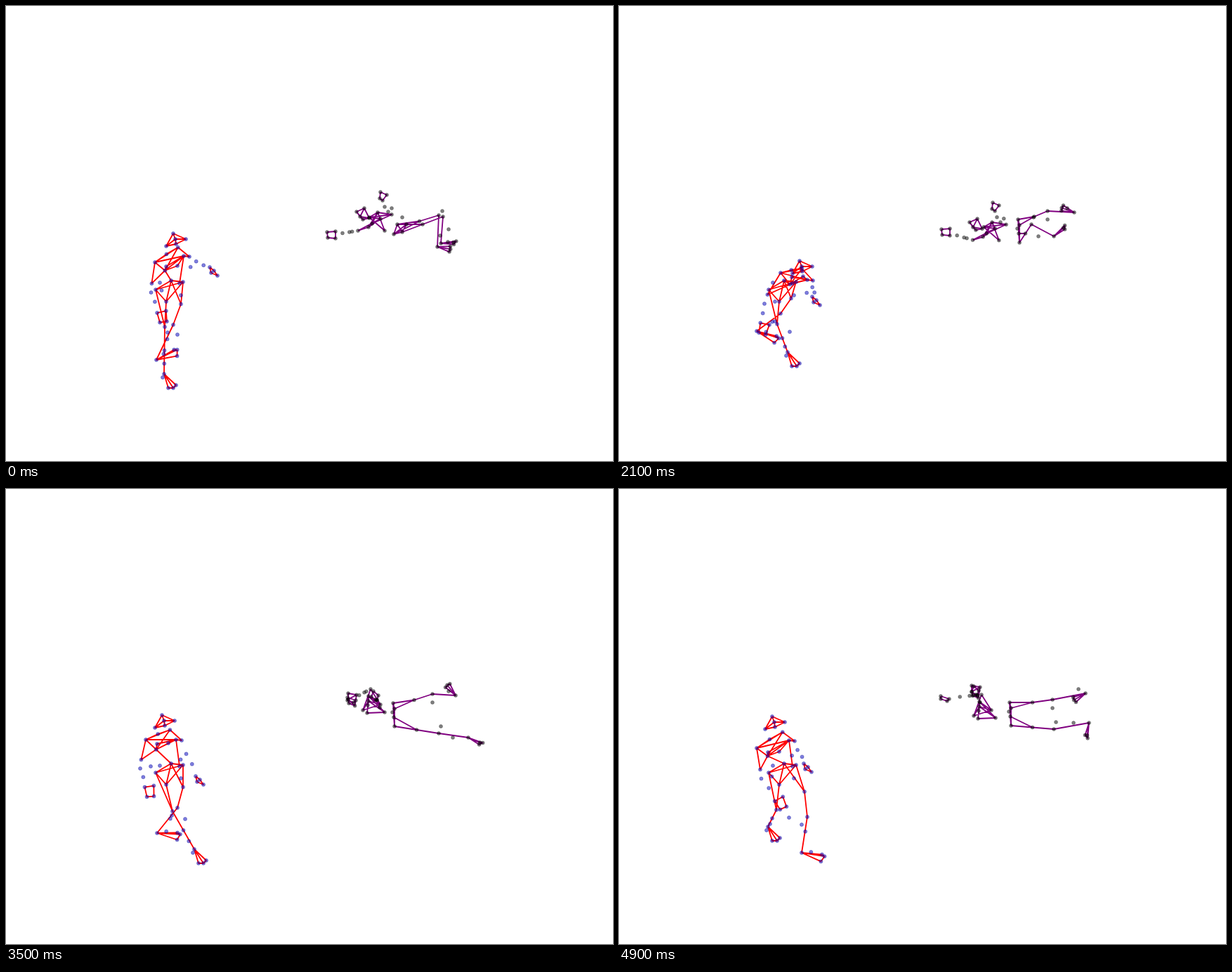
An HTML page with a canvas that plays this animation: 864x648 px, repeating every 5000 ms.

```html
<!DOCTYPE html>
<html lang="en">
<head>
<meta charset="utf-8">
<title>Two marker skeletons</title>
<style>
html, body { margin: 0; width: 100%; height: 100%; overflow: hidden; background: #fff; }
canvas { display: block; }
</style>
</head>
<body>
<canvas id="stage" width="864" height="648"></canvas>
<script>
const ctx = document.getElementById('stage').getContext('2d');
const LOOP = 5000, STEP = 100;
const KEYS = [0, 800, 2100, 2700, 3500, 4000, 4900];

// Paths of the main joints: x, y (or one angle in degrees) at each key time.
const walkPath = {
  head:  [238,324, 247,342, 257,363, 243,340, 222,322, 216,319, 218,324],
  shR:   [212,365, 211,379, 230,380, 219,374, 199,357, 195,356, 196,369],
  shL:   [253,356, 252,363, 268,390, 262,376, 242,357, 238,350, 242,358],
  handR: [223,443, 252,446, 206,460, 199,434, 205,431, 208,437, 231,448],
  handL: [295,378, 256,351, 280,420, 281,437, 275,415, 285,403, 268,397],
  kneeA: [238,454, 250,459, 230,438, 232,448, 244,454, 255,456, 268,467],
  heelA: [214,504, 228,509, 196,463, 198,475, 215,490, 230,498, 260,518],
  kneeB: [226,457, 220,453, 225,453, 233,455, 237,459, 238,458, 224,457],
  heelB: [225,524, 208,481, 240,493, 252,500, 268,513, 242,513, 212,481],
  turnA: [-26, -10, 18, 11, 3, 3, 9]
};
const crawlPath = {
  head:  [499,293, 500,299, 499,308, 493,306, 487,291, 495,284, 502,280],
  neck:  [529,294, 530,301, 531,308, 525,307, 516,302, 511,306, 513,310],
  handR: [463,326, 463,333, 465,322, 487,297, 491,300, 471,299, 463,298],
  handL: [536,271, 537,277, 535,286, 533,289, 526,294, 514,290, 508,287],
  hip:   [557,311, 560,314, 568,304, 561,305, 551,305, 552,304, 556,304],
  kneeA: [616,298, 610,294, 610,292, 598,289, 607,292, 617,300, 617,300],
  kneeB: [622,300, 598,296, 587,311, 620,326, 616,348, 615,344, 619,342],
  heelA: [614,343, 618,339, 648,294, 631,287, 640,294, 660,306, 664,291],
  heelB: [619,338, 639,319, 619,328, 639,347, 658,354, 665,339, 669,333],
  turnA: [10, -14, -160, -165, -129, -106, -210],
  turnB: [-8, -77, -45, -17, 20, 90, 95]
};

// Smooth curve through the key values; the loop restarts with a cut.
function along(track, t) {
  const last = KEYS.length - 1, dim = track.length / KEYS.length;
  const k = Math.max(0, KEYS.findLastIndex((key, i) => i < last && t >= key));
  const span = KEYS[k + 1] - KEYS[k], u = (t - KEYS[k]) / span, v = 1 - u;
  return Array.from({ length: dim }, (_, axis) => {
    const val = i => track[dim * i + axis];
    const slope = i => {
      const a = Math.max(i - 1, 0), b = Math.min(i + 1, last);
      return (val(b) - val(a)) / (KEYS[b] - KEYS[a]);
    };
    return val(k) * (1 + 2 * u) * v * v + val(k + 1) * u * u * (3 - 2 * u)
      + span * u * v * (slope(k) * v - slope(k + 1) * u);
  });
}

const poseAt = (paths, t) =>
  Object.fromEntries(Object.entries(paths).map(([name, track]) => [name, along(track, t)]));

const lerp = (a, b, u) => a.map((v, i) => v + (b[i] - v) * u);
const shift = (p, x, y) => [p[0] + x, p[1] + y];
const between = (a, b, u, x = 0, y = 0) => shift(lerp(a, b, u), x, y);

function ease(t, from, to) {
  const u = Math.min(1, Math.max(0, (t - from) / (to - from)));
  return u * u * (3 - 2 * u);
}

// Sets a rigid part, given by offsets from its origin, turned by some degrees.
function place(marks, origin, part, turn = 0) {
  const c = Math.cos(turn * Math.PI / 180), s = Math.sin(turn * Math.PI / 180);
  for (const name in part) {
    const [x, y] = part[name];
    marks[name] = shift(origin, x * c - y * s, x * s + y * c);
  }
}

// Sets a part that rolls over in depth: its offsets blend from one view to another.
function roll(marks, origin, part, u) {
  for (const name in part) {
    const [x0, y0, x1, y1] = part[name];
    marks[name] = shift(origin, x0 + (x1 - x0) * u, y0 + (y1 - y0) * u);
  }
}

function walker(t) {
  const p = poseAt(walkPath, t), { shR, shL, handR, handL, kneeA, heelA, kneeB, heelB } = p;
  const m = { shR, shL, kneeA, heelA, kneeB, heelB };

  place(m, p.head, { top: [0, 0], brow: [18, 8], nape: [-10, 18], chin: [4, 15], crown: [3, 8] });
  place(m, shR, { ribR: [16, 6], ribL: [32, 5] });
  m.neck = between(shR, shL, .8, 0, -14);
  m.chest = between(shR, shL, .25, 4, 14);
  m.back = between(shR, shL, .4, 0, -8);
  m.elL = shift(shL, 8, 1);

  m.elR = between(shR, handR, .4, -9, -1);
  m.armR1 = between(shR, handR, .5, -11, 4);
  m.armR2 = between(shR, handR, .72, -8, 0);
  m.armR3 = between(shR, handR, .5, 4, 1);
  m.armL1 = between(shL, handL, .35, -5, 8);
  m.armL2 = between(shL, handL, .35, 3, 0);
  m.armL3 = between(shL, handL, .6, 3, 0);
  const swing = Math.atan2(handR[0] - shR[0], handR[1] - shR[1]) * 180 / Math.PI;
  place(m, handR, { hR1: [-7, -7], hR2: [6, -8], hR3: [5, 7], hR4: [-5, 7] }, -swing);
  place(m, handL, { hL1: [-5, -6], hL2: [1, -1], hL3: [6, 6], hL4: [-3, 2] });

  place(m, [213, 404], {
    hipR: [0, 0], hipL: [39, -11], sac: [22, -13], thR: [15, 17],
    waist: [34, -9], thL: [36, 8], side: [6, -10]
  });
  m.thA = between(m.hipL, kneeA, .5, 4, 1);
  m.shinB = between(kneeB, heelB, .5);
  m.legA1 = shift(kneeA, -8, 11);
  m.legA2 = between(kneeA, heelA, .35, 0, 3);
  m.legB1 = shift(kneeB, 18, 11);
  m.legB2 = between(kneeB, heelB, .75, 0, 2);
  place(m, heelA, { toeA: [29, -2], midA: [33, 0], tipA: [29, 8], ankA: [13, -3] }, p.turnA[0]);
  place(m, heelB, { toeB: [6, 20], midB: [13, 20], tipB: [17, 16], ankB: [-2, 5] });
  return m;
}

function crawler(t) {
  const p = poseAt(crawlPath, t), { handR, handL, hip, kneeA, kneeB, heelA, heelB } = p;
  const m = { hipA: hip, kneeA, kneeB, heelA, heelB };
  const chestRoll = ease(t, 2000, 3300), hipRoll = ease(t, 300, 1900);

  place(m, p.head, { top: [0, 0], brow: [11, -5], chin: [18, 9], nape: [9, 11], crown: [5, 7] },
    35 * chestRoll);
  roll(m, p.neck, {
    neck: [0, 0, 0, 0], shR: [-28, 26, 3, -17], rib: [-13, 21, -8, 13], belly: [-8, 16, -2, 17],
    chest: [-12, 7, 0, -7], elL: [20, 3, 23, 16], side: [4, 9, 17, 5], low: [10, 26, -1, 6]
  }, chestRoll);
  roll(m, handR, {
    hR1: [-6, -4, -5, -3], hR2: [6, -5, 7, 1], hR3: [6, 5, 4, 4], hR4: [-5, 4, -5, 1]
  }, chestRoll);
  roll(m, handL, {
    hL1: [-3, -6, -3, -6], hL2: [6, -2, 4, 0], hL3: [0, 6, 2, 7], hL4: [-4, 3, -6, 2],
    armL1: [3, 15, 2, 6], armL2: [8, 22, 6, 17], armL3: [13, 17, 0, 6]
  }, chestRoll);
  [.42, .68, .78].forEach((u, i) => m['armR' + i] = between(handR, m.shR, u));

  roll(m, hip, {
    hipB: [7, 11, 2, 33], hipC: [13, 0, 1, 20], sac: [-5, 14, 2, 8], thL: [7, -10, -1, 13]
  }, hipRoll);
  m.thA = between(hip, kneeA, .5, 2, 2);
  m.thB = between(m.hipB, kneeB, .5);
  roll(m, kneeA, { legA: [5, -6, 0, 12] }, hipRoll);
  roll(m, kneeB, { legB: [8, 18, 3, -10] }, hipRoll);
  roll(m, heelA, { ankA: [4, -16, -10, -6] }, hipRoll);
  roll(m, heelB, { ankB: [10, -2, -22, 0] }, hipRoll);
  place(m, heelA, { toeA: [19, 0], midA: [18, 4], tipA: [18, -4] }, p.turnA[0]);
  place(m, heelB, { toeB: [18, 4], midB: [22, 0], tipB: [18, 1] }, p.turnB[0]);
  return m;
}

// Links are chains of marker names.
const foot = s => `heel${s}-toe${s}-mid${s}-tip${s}-heel${s}-mid${s}`;
const hand = s => `h${s}1-h${s}2-h${s}3-h${s}4-h${s}1`;
const shared = `top-brow-chin-nape-top-crown-chin brow-crown-nape
  ${foot('A')} ${foot('B')} ${hand('R')} ${hand('L')}`;
const chains = text => (shared + text).split(/\s+/).map(c => c.split('-'));

const walkLinks = chains(`
  shR-back-neck-elL-shL-shR-chest-neck-shR-elR-chest-shL-waist chest-ribL-shL-ribR-chest-sac
  sac-hipR-hipL-thR-sac-hipL-thA-sac hipR-thR-kneeB-hipR thA-kneeA-heelA kneeB-shinB-heelB`);
const crawlLinks = chains(`
  shR-rib-neck-elL-chest-neck-low-chest-side-rib shR-side-neck-belly-elL
  hipA-hipB-hipC-hipA-sac-hipB sac-hipC-thB-hipB hipA-thA-sac thA-kneeA-heelA thB-kneeB-heelB`);

function drawFigure(marks, links, line, fill, edge) {
  ctx.strokeStyle = line;
  ctx.lineWidth = 1.8;
  ctx.lineJoin = 'round';
  ctx.beginPath();
  for (const chain of links)
    chain.forEach((name, i) => ctx[i ? 'lineTo' : 'moveTo'](...marks[name]));
  ctx.stroke();

  ctx.fillStyle = fill;
  ctx.strokeStyle = edge;
  ctx.lineWidth = 1;
  for (const spot of Object.values(marks)) {
    ctx.beginPath();
    ctx.arc(...spot, 2.5, 0, 2 * Math.PI);
    ctx.fill();
    ctx.stroke();
  }
}

const start = performance.now();
function draw() {
  const t = Math.floor((performance.now() - start) % LOOP / STEP) * STEP;
  ctx.clearRect(0, 0, 864, 648);
  drawFigure(walker(t), walkLinks, '#f00', 'rgba(0,0,190,.5)', 'rgba(0,0,150,.35)');
  drawFigure(crawler(t), crawlLinks, '#800080', 'rgba(0,0,0,.5)', 'rgba(0,0,0,.25)');
  requestAnimationFrame(draw);
}
draw();
</script>
</body>
</html>
```
